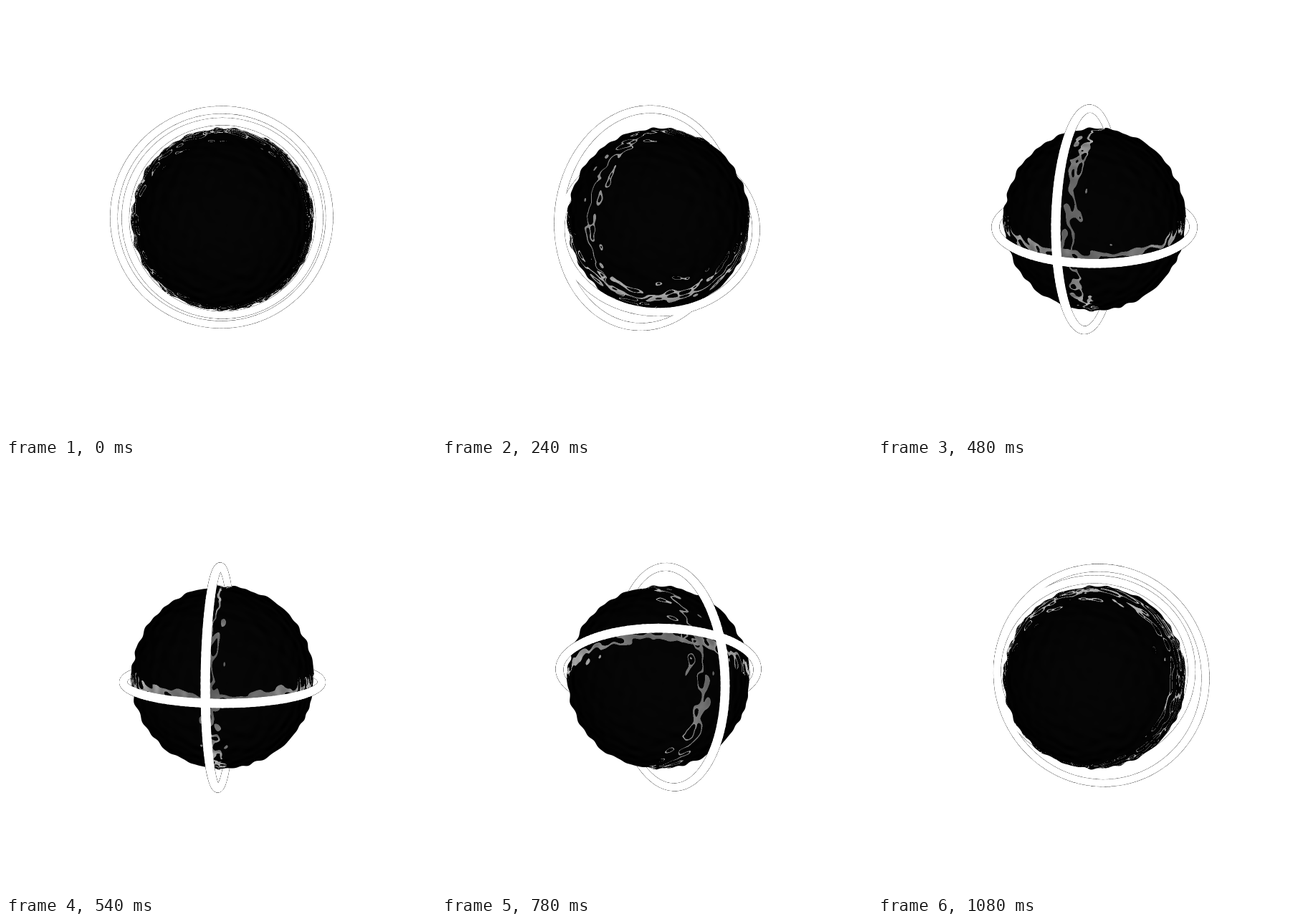
Write an HTML page with a canvas that moves like this. It is 600 by 600 pixels and loops after 1140 ms.

```html
<!DOCTYPE html>
<html lang="en">
<head>
<meta charset="utf-8">
<title>Ringed sphere</title>
<style>
html, body { margin: 0; width: 100%; height: 100%; overflow: hidden; background: #fff; }
canvas { display: block; }
</style>
</head>
<body>
<canvas id="stage" width="600" height="600"></canvas>
<script>
const STEP = 60, STEPS = 19;
const CX = 302, CY = 298, EYE = 620, BALL = 125, TUBE = 5, PITCH = 0.09;
const RADII = [150.4, 135.3];
const HALF = 136, SCALE = 2, SIZE = HALF * 2 * SCALE;

const ctx = document.getElementById('stage').getContext('2d');
const ball = document.createElement('canvas');
ball.width = ball.height = SIZE;
const ballCtx = ball.getContext('2d');
const image = ballCtx.createImageData(SIZE, SIZE);

const dot = (a, b) => a[0] * b[0] + a[1] * b[1] + a[2] * b[2];
const along = (p, d, t) => [p[0] + d[0] * t, p[1] + d[1] * t, p[2] + d[2] * t];
const unit = v => { const l = Math.hypot(...v); return [v[0] / l, v[1] / l, v[2] / l]; };
const clamp = v => Math.max(0, Math.min(1, v));

let seed = 11;
function random() {
  seed = (seed * 16807) % 2147483647;
  return seed / 2147483647;
}

// The rough surface is a sum of random plane waves.
const waves = Array.from({ length: 24 }, () => {
  const z = random() * 2 - 1, turn = random() * 2 * Math.PI, r = Math.sqrt(1 - z * z);
  const k = 0.26 + 0.24 * random();
  return {
    k: [r * Math.cos(turn) * k, r * Math.sin(turn) * k, z * k],
    amp: 0.085 / k,
    phase: random() * 2 * Math.PI
  };
});

const height = p => waves.reduce((sum, w) => sum + w.amp * Math.sin(dot(w.k, p) + w.phase), 0);

function slope(p) {
  let g = [0, 0, 0];
  for (const w of waves) g = along(g, w.k, w.amp * Math.cos(dot(w.k, p) + w.phase));
  return g;
}

// Everything about the surface that stays fixed while the rings turn.
const samples = [];
function addSample(ix, iy) {
  const x = (ix + 0.5) / SCALE - HALF, y = (iy + 0.5) / SCALE - HALF;
  const eye = [0, 0, EYE], view = unit([x, y, -EYE]);
  const near = along(eye, view, -dot(eye, view));
  const dist = Math.hypot(...near);
  if (dist > BALL + 4) return;
  let edge = BALL;
  if (dist > BALL - 5) edge += height(near.map(v => v * BALL / dist));
  const alpha = clamp((edge - dist) * SCALE + 0.5);
  if (!alpha) return;

  const shrink = Math.min(1, BALL * 0.9995 / dist);
  const mid = near.map(v => v * shrink);
  const p = along(mid, view, -Math.sqrt(BALL * BALL - dot(mid, mid)));
  const flat = unit(p), g = slope(p);
  const normal = unit(along(along(flat, g, -1), flat, dot(g, flat)));
  const facing = dot(view, normal);
  const ray = along(view, normal, -2 * facing);
  const rise = dot(p, ray);
  const rim = 1 - clamp(-facing);
  samples.push({
    at: (iy * SIZE + ix) * 4, p, ray, alpha: alpha * 255, up: rise > 0,
    dark: 6 - 6 * rim, light: 90 + 120 * rim,
    reach: RADII.map(r => along(p, ray, -rise + Math.sqrt(rise * rise + r * r - dot(p, p))))
  });
}
for (let iy = 0; iy < SIZE; iy++) for (let ix = 0; ix < SIZE; ix++) addSample(ix, iy);

function pitch([x, y, z]) {
  const c = Math.cos(PITCH), s = Math.sin(PITCH);
  return [x, y * c + z * s, z * c - y * s];
}

function makeRings(angle) {
  const c = Math.cos(angle), s = Math.sin(angle);
  return [
    { r: RADII[0], u: pitch([-c, 0, s]), v: pitch([0, 1, 0]), n: pitch([s, 0, c]) },
    { r: RADII[1], u: pitch([0, c, s]), v: pitch([1, 0, 0]), n: pitch([0, s, -c]) }
  ];
}

function hits(sample, ring, i) {
  if (Math.abs(dot(sample.reach[i], ring.n)) < TUBE) return true;
  const t = -dot(sample.p, ring.n) / dot(sample.ray, ring.n);
  if (!(t > 0 && t < 400)) return false;
  const q = along(sample.p, sample.ray, t);
  return Math.abs(Math.sqrt(dot(q, q)) - ring.r) < TUBE;
}

function drawBall(rings) {
  const data = image.data;
  for (const s of samples) {
    const lit = s.up && (hits(s, rings[0], 0) || hits(s, rings[1], 1));
    data[s.at] = data[s.at + 1] = data[s.at + 2] = lit ? s.light : s.dark;
    data[s.at + 3] = s.alpha;
  }
  ballCtx.putImageData(image, 0, 0);
  ctx.drawImage(ball, CX - HALF, CY - HALF, HALF * 2, HALF * 2);
}

function ringPoint(ring, turn) {
  const p = along(along([0, 0, 0], ring.u, ring.r * Math.sin(turn)), ring.v, ring.r * Math.cos(turn));
  const f = EYE / (EYE - p[2]);
  return { x: CX + p[0] * f, y: CY + p[1] * f, f };
}

// Half of a tube in one colour, facing the viewer or away from it.
function drawHalf(ring, front, color, extra) {
  const mid = Math.atan2(ring.u[2], ring.v[2]) + (front ? 0 : Math.PI);
  const count = 72, step = Math.PI / count;
  ctx.lineCap = 'round';
  ctx.strokeStyle = color;
  for (let i = 0; i < count; i++) {
    const start = mid - Math.PI / 2 + i * step;
    const a = ringPoint(ring, start), b = ringPoint(ring, start + step);
    ctx.lineWidth = TUBE * (a.f + b.f) + extra;
    ctx.beginPath();
    ctx.moveTo(a.x, a.y);
    ctx.lineTo(b.x, b.y);
    ctx.stroke();
  }
}

// Outlines lie under everything, so only the rim of the joined rings shows.
function draw(index) {
  const rings = makeRings((1.7 + 9.04 * index) * Math.PI / 180);
  const halves = (front, color, extra) => rings.forEach(ring => drawHalf(ring, front, color, extra));
  ctx.fillStyle = '#fff';
  ctx.fillRect(0, 0, 600, 600);
  halves(false, '#222', 0.6);
  halves(true, '#222', 0.6);
  halves(false, '#fff', 0);
  drawBall(rings);
  halves(true, '#fff', 0);
}

let shown = -1;
function tick() {
  const index = Math.floor(performance.now() / STEP) % STEPS;
  if (index !== shown) draw(shown = index);
  requestAnimationFrame(tick);
}
tick();
</script>
</body>
</html>
```
